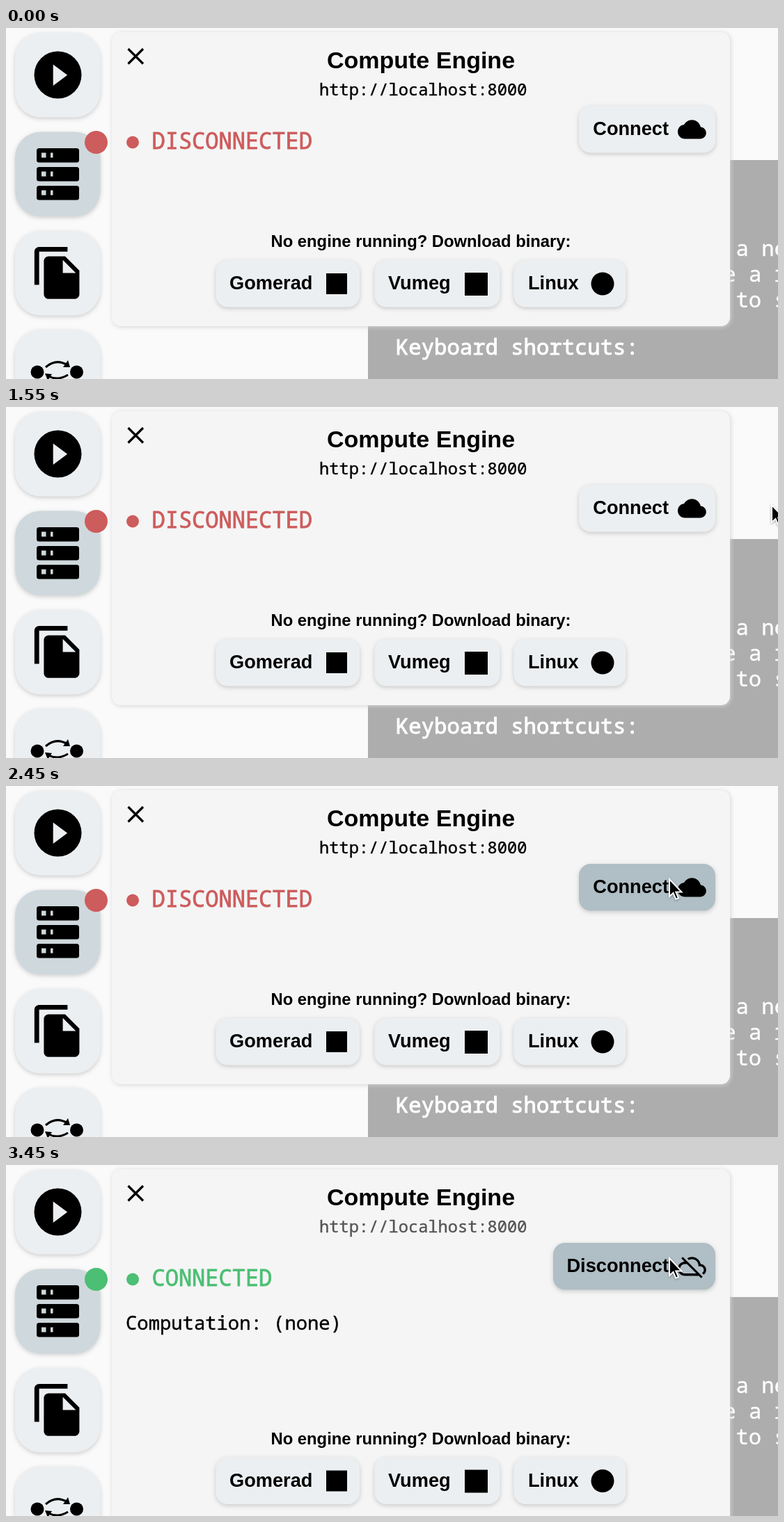
Recreate the animation shown at these times as an HTML page. Size 1109x505 px, loop 3.5 s.

```html
<!DOCTYPE html>
<html lang="en">
<head>
<meta charset="utf-8">
<title>Compute Engine</title>
<style>
  html, body { margin: 0; width: 100%; height: 100%; overflow: hidden; background: #fafafa; }
  svg { display: block; width: 1109px; height: 505px; }
  text { font: bold 27.2px "Liberation Sans", Arial, sans-serif; }
  .mono {
    font-family: "Noto Sans Mono", "DejaVu Sans Mono", monospace; font-weight: 400;
    fill: currentColor; stroke: currentColor; stroke-width: .4px;
  }
  .note { font-size: 30.6px; color: #fff; }
  .btn { fill: #eceff1; filter: drop-shadow(0 2px 3px rgba(0, 0, 0, .18)); }
  .on { fill: #cfd8dc; }
  .panel { fill: #f5f5f5; filter: drop-shadow(1px 1px 3px #d3d3d3); }
  .line { fill: none; stroke: #000; stroke-width: 3; }
  #state { fill: currentColor; }
  #status { font-size: 32px; stroke-width: .8px; }
  #url { font-size: 23.7px; }
  #cursor { filter: drop-shadow(0 1.5px 1.5px rgba(0, 0, 0, .35)); }
</style>
</head>
<body>
<svg viewBox="0 0 1109 505">
  <rect x="520" y="190" width="589" height="315" fill="#adadad"/>
  <g>
    <text class="mono note" x="1048.5" y="328">a new</text>
    <text class="mono note" x="1030.2" y="365">e a r</text>
    <text class="mono note" x="1048.5" y="402">to s</text>
    <text class="mono note" x="560" y="470" style="stroke-width:1px">Keyboard shortcuts:</text>
  </g>

  <!-- sidebar -->
  <rect class="btn" x="13" y="7" width="122.5" height="121.5" rx="37"/>
  <rect class="btn on" x="13" y="149.5" width="122.5" height="121.5" rx="37"/>
  <rect class="btn" x="13" y="292" width="122.5" height="121.5" rx="37"/>
  <rect class="btn" x="13" y="434" width="122.5" height="121.5" rx="37"/>
  <circle cx="74.5" cy="67.5" r="34"/>
  <path d="M67.7 52.5V83L88.1 67.7z" fill="#eceff1"/>
  <g id="server"></g>
  <path transform="translate(34 311.6) scale(3.4)" d="M16 1H4c-1.1 0-2 .9-2 2v14h2V3h12V1zm-1 4l6 6v10c0 1.1-.9 2-2 2H8c-1.1 0-2-.9-2-2V7c0-1.1.9-2 2-2h7zm-1 7h5.5L14 6.5V12z"/>
  <circle cx="45" cy="495" r="9.5"/>
  <circle cx="101.500" cy="495" r="9.5"/>
  <path class="line" d="M57 488Q72 475 88 485M89 499Q75 508 61 501"/>
  <path d="M82 488L92 488L89 478zM56 497L66 498L60 507z"/>

  <!-- engine panel -->
  <rect class="panel" id="panel" x="152" y="6" width="888" height="423" rx="13"/>
  <path class="line" d="M175.500 30L197 51.500M197 30L175.500 51.500" style="stroke-width:3.2"/>
  <text x="596" y="57.500" text-anchor="middle" style="font-size:34px">Compute Engine</text>
  <text class="mono" id="url" x="450" y="97">http://localhost:8000</text>
  <g id="state">
    <circle cx="129.500" cy="164.500" r="16.500"/>
    <circle cx="182" cy="164.500" r="9"/>
    <text class="mono" id="status" x="209.500" y="174"></text>
  </g>
  <text class="mono" id="job" x="172" y="237">Computation: (none)</text>
  <rect class="btn" id="link" y="112" height="67.500" rx="17"/>
  <text id="linkText" x="952" y="154" text-anchor="end"></text>
  <path id="cloud" transform="translate(965 125.400) scale(1.7)"/>

  <g id="downloads">
    <text x="596" y="315" text-anchor="middle" style="font-size:23.8px">No engine running? Download binary:</text>
    <rect class="btn" x="301.500" y="334" width="206.500" height="67.500" rx="17"/>
    <text x="321" y="376">Gomerad</text>
    <rect x="460" y="353" width="30" height="30"/>
    <rect class="btn" x="529.500" y="334" width="180" height="67.500" rx="17"/>
    <text x="549" y="376">Vumeg</text>
    <rect x="659" y="352" width="33" height="33"/>
    <rect class="btn" x="729.500" y="334" width="161" height="67.500" rx="17"/>
    <text x="750" y="376">Linux</text>
    <circle cx="857" cy="368" r="16.500"/>
  </g>

  <path id="cursor" d="M0 0V25L5.500 20L9.300 28.800L13 27.200L9.300 18.500H17.500z" stroke="#fff" stroke-width="2"/>
</svg>
<script>
const LOOP = 3500, STEP = 50, CONNECT_AT = 2500;
const $ = id => document.getElementById(id);
const set = (id, attrs) => {
  for (const [key, value] of Object.entries(attrs)) $(id).setAttribute(key, value);
};

const CLOUD = 'M19.35 10.04C18.67 6.59 15.64 4 12 4 9.11 4 6.6 5.64 5.35 8.04 2.34 8.36 0 10.91 0 14c0 3.31 2.69 6 6 6h13c2.76 0 5-2.24 5-5 0-2.64-2.05-4.78-4.65-4.96z';
const CLOUD_OFF = 'M19.35 10.04C18.67 6.59 15.64 4 12 4c-1.48 0-2.85.43-4.01 1.17l1.46 1.46C10.21 6.23 11.08 6 12 6c3.04 0 5.5 2.46 5.5 5.5v.5H19c1.66 0 3 1.34 3 3 0 1.13-.64 2.11-1.56 2.62l1.45 1.45C23.16 18.16 24 16.68 24 15c0-2.64-2.05-4.78-4.65-4.96zM3 5.27l2.75 2.74C2.56 8.15 0 10.77 0 14c0 3.31 2.69 6 6 6h11.73l2 2L21 20.73 4.27 4 3 5.27zM7.73 10l8 8H6c-2.21 0-4-1.79-4-4s1.79-4 4-4h1.73z';

$('server').innerHTML = [173, 200, 227].map(y => `
  <rect x="44" y="${y}" width="61" height="20.5" rx="3.5"/>
  <path d="M51 ${y + 6.5}h6.5v7h-6.5zM64 ${y + 6.5}h3.5v7h-3.5z" fill="#cfd8dc"/>`).join('');

// Pointer path: time, x, y
const PATH = [
  [1500, 1114, 142], [1550, 1100, 141], [1600, 1084, 140], [1650, 1064, 138],
  [1700, 1042, 136], [1750, 1020, 134], [1800, 1000, 133], [1850, 982, 132],
  [1900, 969, 132], [1950, 960, 133], [2000, 955, 134], [2050, 953, 134]
];

function pointer(t) {
  const next = PATH.findIndex(p => p[0] > t);
  if (next === 0) return [1200, 142];
  if (next < 0) return PATH[PATH.length - 1].slice(1);
  const [a, b] = [PATH[next - 1], PATH[next]];
  const k = (t - a[0]) / (b[0] - a[0]);
  return [1, 2].map(i => a[i] + (b[i] - a[i]) * k);
}

// The button darkens while the pointer rests on it.
function linkColor(t) {
  const k = Math.min(1, Math.max(0, (t - 1800) / 100));
  const from = [236, 239, 241], to = [176, 190, 197];
  return `rgb(${from.map((c, i) => Math.round(c + (to[i] - c) * k))})`;
}

function draw(time) {
  const t = Math.floor(time % LOOP / STEP) * STEP;
  const up = t >= CONNECT_AT;
  set('panel', { height: up ? 509.5 : 423 });
  set('downloads', { transform: `translate(0 ${up ? 86.5 : 0})` });
  set('state', { color: up ? '#4bbf73' : '#cd5c5c' });
  set('url', { color: up ? '#555' : '#000' });
  set('job', { visibility: up ? 'visible' : 'hidden' });
  set('link', { x: up ? 786 : 823, width: up ? 233 : 196 });
  set('cloud', { d: up ? CLOUD_OFF : CLOUD });
  set('cursor', { transform: `translate(${pointer(t).join(' ')})` });
  $('link').style.fill = linkColor(t);
  $('status').textContent = up ? 'CONNECTED' : 'DISCONNECTED';
  $('linkText').textContent = up ? 'Disconnect' : 'Connect';
}

const start = performance.now();
function tick() {
  draw(performance.now() - start);
  requestAnimationFrame(tick);
}
tick();
</script>
</body>
</html>
```
